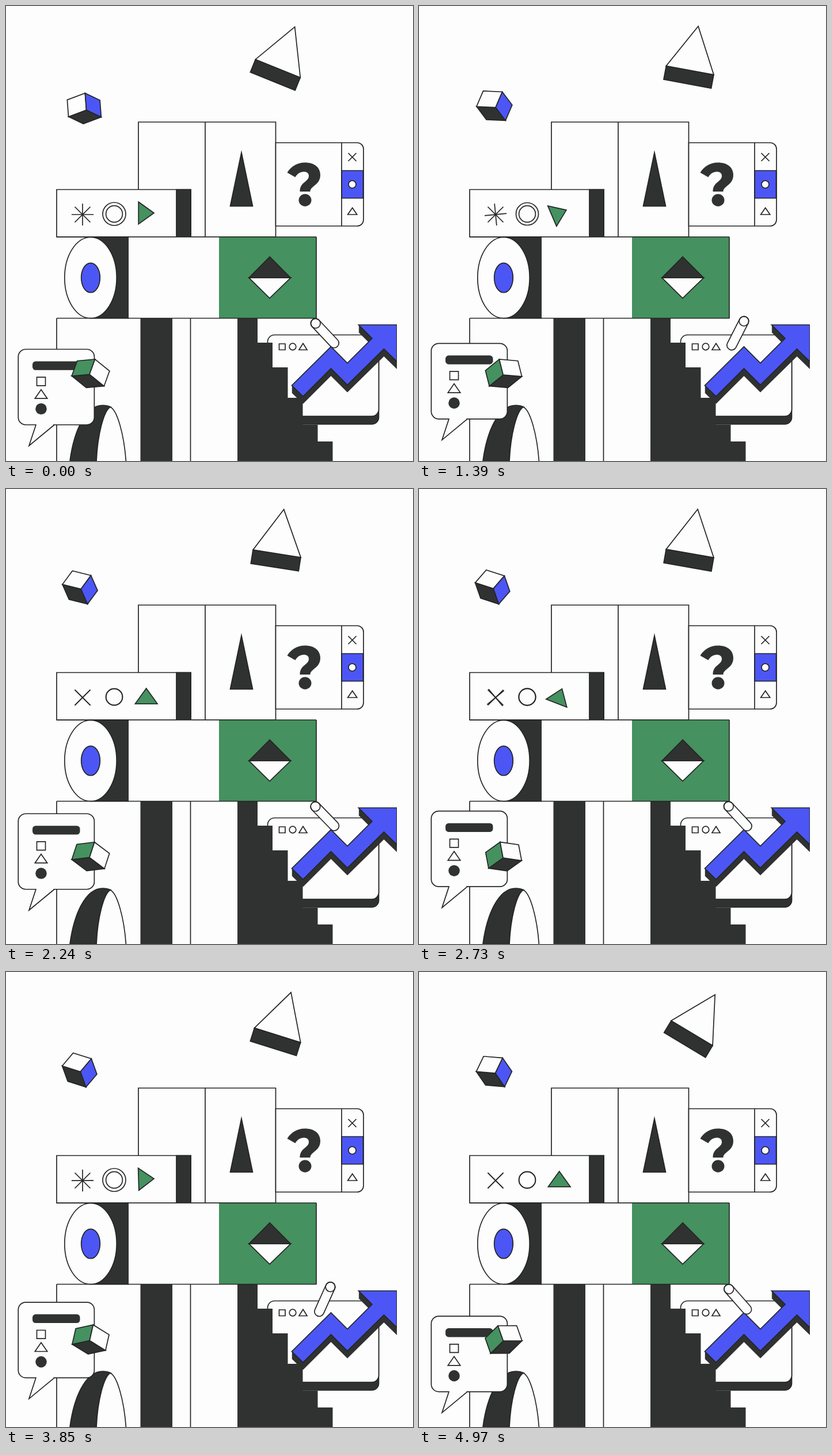
Recreate the animation shown at these times as an HTML page with a canvas. Size 707x792 px, loop 5000 ms.

```html
<!DOCTYPE html>
<html lang="en">
<head>
<meta charset="utf-8">
<title>Shapes</title>
<style>
  html, body { margin: 0; width: 100%; height: 100%; overflow: hidden; background: #fdfdfd; }
  canvas { display: block; width: 707px; height: 792px; }
</style>
</head>
<body>
<canvas id="stage" width="707" height="792"></canvas>
<script>
const ctx = document.getElementById('stage').getContext('2d');
const LOOP = 5000, RAD = Math.PI / 180;
const WHITE = '#fdfdfd', DARK = '#303231', INK = '#232524', BLUE = '#4c56f5', GREEN = '#45915f';

// Goes 0 to 1 and back, each way taking `half` ms; a higher power holds the ends longer.
function swing(t, start, half, power) {
  const p = (t - start) / half, k = Math.floor(p), u = p - k;
  const ease = v => (2 * v) ** power / 2;
  const e = u < 0.5 ? ease(u) : 1 - ease(1 - u);
  return k % 2 ? 1 - e : e;
}

function paint(fill, stroke = INK, path) {
  const args = path ? [path] : [];
  ctx.lineWidth = 1.7;
  if (fill) { ctx.fillStyle = fill; ctx.fill(...args); }
  if (stroke) { ctx.strokeStyle = stroke; ctx.stroke(...args); }
}
function shape(d, fill, stroke) {
  paint(fill, stroke, new Path2D(d));
}
function box(x1, y1, x2, y2, fill, stroke, radius = 0) {
  ctx.beginPath();
  ctx.roundRect(x1, y1, x2 - x1, y2 - y1, radius);
  paint(fill, stroke);
}
function oval(x, y, rx, ry = rx, fill, stroke) {
  ctx.beginPath();
  ctx.ellipse(x, y, rx, ry, 0, 0, Math.PI * 2);
  paint(fill, stroke);
}
function line(x1, y1, x2, y2) {
  shape(`M${x1} ${y1}L${x2} ${y2}`);
}
// Upright triangle: apex, half the base, height.
function peak(x, y, half, height, fill, stroke) {
  shape(`M${x} ${y}l${half} ${height}h${-2 * half}Z`, fill, stroke);
}
function at(x, y, deg, draw) {
  ctx.save();
  ctx.translate(x, y);
  ctx.rotate(deg * RAD);
  draw();
  ctx.restore();
}
function cross(x, y, r, deg = 0) {
  at(x, y, deg, () => { line(-r, -r, r, r); line(-r, r, r, -r); });
}

// A cube as three parallelograms; each edge is [length, angle].
function cube(cx, cy, edges, fills) {
  const [a, b, c] = edges.map(([len, deg]) => [len * Math.cos(deg * RAD), len * Math.sin(deg * RAD)]);
  const x = cx - (a[0] + b[0] + c[0]) / 2, y = cy - (a[1] + b[1] + c[1]) / 2;
  const face = (p, q, fill) => shape(`M${x} ${y}l${p}l${q}l${-p[0]} ${-p[1]}Z`, fill);
  face(a, c, fills[2]);
  face(a, b, fills[0]);
  face(b, c, fills[1]);
}

function topFloor(t) {
  box(230, 202, 468.5, 402, WHITE);
  line(346, 202, 346, 402);
  peak(409, 255, 19.5, 93.5, DARK);

  box(468.5, 238, 621, 383, WHITE, INK, [0, 11, 11, 0]);
  box(583, 286.5, 620.5, 334.5, BLUE);
  line(583, 238, 583, 383);
  cross(601.5, 263, 7);
  oval(601.5, 310.5, 6.5, 6.5, WHITE);
  peak(601.7, 351.3, 8, 11.7, WHITE);
  shape('M488.5 290C495 279 506 272.5 519 272.5C536 272.5 546 281 546 294C546 312 528.5 313 528.5 323' +
    'L510.5 323C510.5 306 526 306 526 296C526 291 523 288.5 517 288.5C511 288.5 506 292 502.5 298Z', DARK, null);
  oval(519.5, 338, 11, 10.7, DARK, null);

  box(88, 319.5, 321, 402, WHITE);
  box(296, 319.5, 321, 402, DARK);
  // Symbols change one after another.
  const change = start => swing(Math.max(t, start), start, 1350, 5);
  cross(133, 363, 13.5);
  cross(133, 363, 13.5, 45 * (1 - change(880)));
  oval(188, 362, 14.4);
  oval(188, 362, 20 - 5.6 * change(910));
  at(243.7, 360.3, 90 * (1 - change(800)), () => peak(0, -13.3, 19.3, 26.8, GREEN));
}

function middleFloor() {
  box(147, 402, 213, 543.5, DARK);
  box(213, 402, 370, 543.5, WHITE, null);
  box(370, 402, 539, 543.5, GREEN, null);
  line(539, 402, 539, 543.5);
  oval(147, 473, 45.2, 70.5, WHITE);
  oval(147, 473, 16.3, 25.7, BLUE);
  shape('M422 473H494.5L458 508.5Z', WHITE);
  peak(458.2, 436.5, 36, 36.5, DARK);
  line(88, 402, 539, 402);
}

function bottomFloor() {
  line(88, 543.5, 88, 792);
  box(233.5, 543.5, 289, 792, DARK, null);
  line(320.5, 543.5, 320.5, 792);
  shape('M111 792C118 740 138 695 168 695C174 695 178 696 182 698C170 705 159 745 157 792Z', DARK);
  shape('M157 793C159 745 170 705 181 698C193 703 205 745 208.5 793Z', WHITE);

  box(454.5, 586, 647.5, 728, DARK, INK, 12);
  box(454.5, 572.5, 647.5, 714, WHITE, INK, 12);
  box(474.5, 588, 485, 598.5, WHITE);
  oval(498, 593, 5.8);
  peak(516, 587.3, 7, 11.2, WHITE);

  // Staircase
  shape('M402 543V792H567.5V758H541.5V729H515.5V682H489.5V629H463V586H437V543Z', DARK, null);
  line(88, 543.5, 539.5, 543.5);
}

function arrow() {
  const d = 'M612.5 555H679V619L656.5 597L593 659.5L564.5 631L516 679.5L496.5 660.5L564.5 593L593 621.5L636 578.5Z';
  ctx.save();
  ctx.beginPath();
  ctx.rect(0, 0, 679, 792);
  ctx.clip();
  ctx.translate(0, 13);
  for (let i = 0; i < 13; i++) {
    shape(d, DARK, null);
    ctx.translate(0, -1);
  }
  shape(d, BLUE);
  ctx.restore();
}

function stick(t) {
  at(553.8, 569.6, -135 + 72 * swing(t, 260, 1100, 4), () => {
    box(-31.8, -8.3, 31.8, 8.3, WHITE, INK, 8.3);
    oval(23.5, 0, 8.3);
  });
}

function bubble(t) {
  ctx.save();
  ctx.translate(0, 600 - 39.5 * swing(t, 430, 2400, 2));
  box(21.3, 0, 153.4, 131.5, WHITE, INK, 13);
  shape('M52 131.5L40 168L84 131.5', WHITE);
  box(53, 129, 82, 132.6, WHITE, null);
  box(46, 21, 128.5, 36.3, DARK, null, 5.5);
  box(53.5, 48.7, 68.5, 63.3, WHITE);
  peak(61, 70.2, 10.7, 15.5, WHITE);
  oval(61, 103.8, 9.8, 9.8, DARK, null);
  ctx.restore();
}

function floaters(t) {
  at(487.7, 118.5, 49.6 - 40.7 * Math.cos((t - 2140) * 0.000387), () => {
    box(-59.9, -3.3, 24.1, 20.8, DARK);
    peak(-17.9, -81.3, 42, 78, WHITE);
  });

  const turn = 13.1 + 31.2 * Math.cos((t - 3250) * 0.00062);
  cube(135.8 - 0.19 * turn, 178.3 - 0.18 * turn,
    [[33.2, 159.5 + 0.9 * turn], [29.4, -94 + 1.05 * turn], [28.6, 26 + 1.05 * turn]], [WHITE, BLUE, DARK]);

  const tilt = -43 * swing(t, 30, 1030, 2);
  cube(147, 639.7, [[31, 175 + tilt], [28, -70 + tilt], [32.5, 39 + tilt]], [GREEN, WHITE, DARK]);
}

function draw(t) {
  ctx.fillStyle = WHITE;
  ctx.fillRect(0, 0, 707, 792);
  topFloor(t);
  middleFloor();
  bottomFloor();
  arrow();
  stick(t);
  bubble(t);
  floaters(t);
}

const begin = performance.now();
function tick(now) {
  draw(Math.max(0, now - begin) % LOOP);
  requestAnimationFrame(tick);
}
draw(0);
requestAnimationFrame(tick);
</script>
</body>
</html>
```
